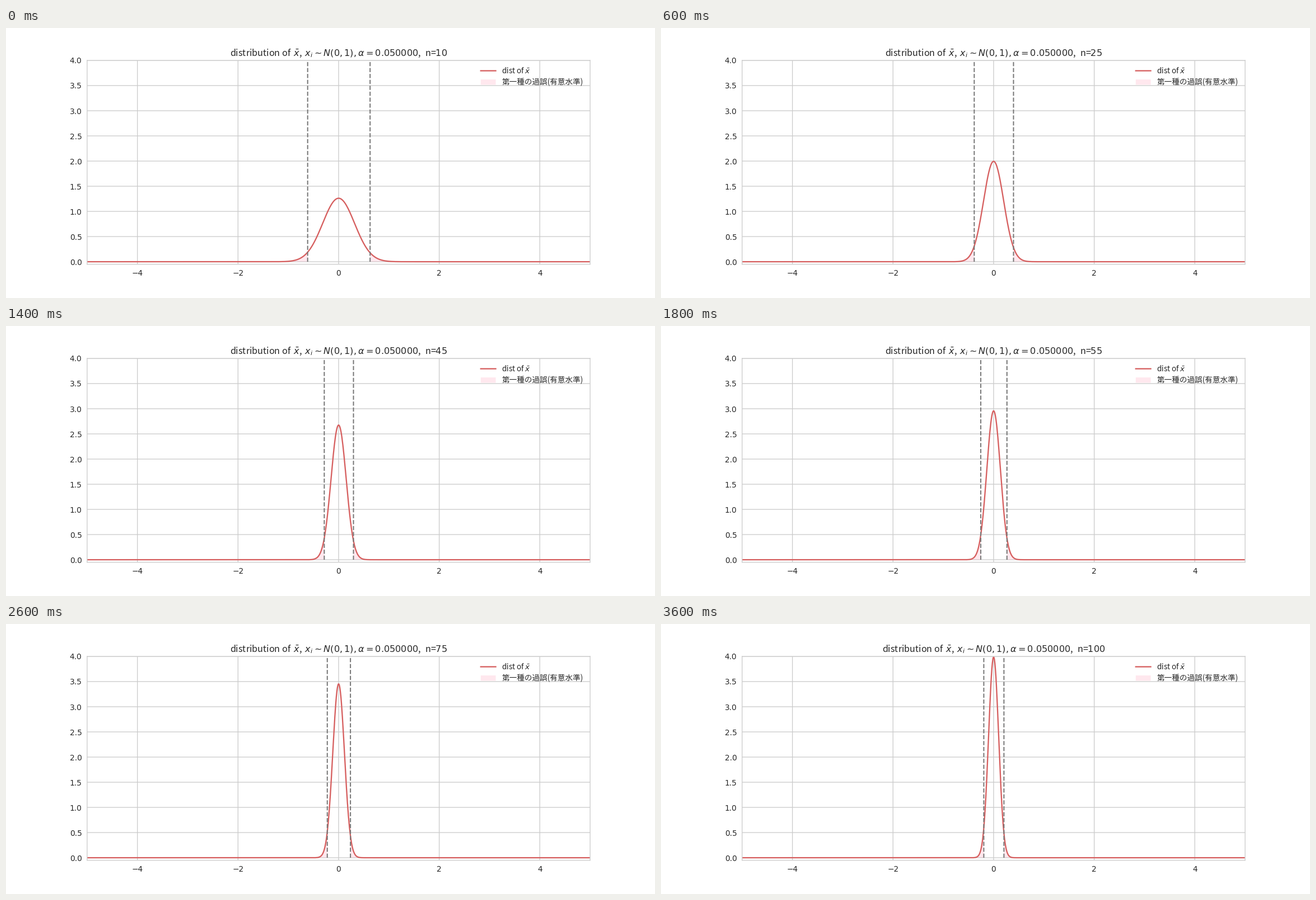
These frames come from a looping animation (1159 by 483 pixels, 3.8 s). A matplotlib script:

```python
import numpy as np
import matplotlib.pyplot as plt
from matplotlib.animation import FuncAnimation
from matplotlib.lines import Line2D
from matplotlib.patches import Rectangle

W, H, DPI = 1159, 483, 96
INK, GRID, RED, PINK, GRAY = "0.15", "0.8", "#d65f5f", "#ffb8cd", "#777777"
TEXT_FONT = "Noto Sans CJK JP"
PINK_ALPHA = 0.32
CURVE_WIDTH = 1.72
Z = 1.959964  # two-sided 5% point of the standard normal
SIZES = range(10, 101, 5)

plt.rcParams["path.snap"] = False
x = np.linspace(-5, 5, 1000)

fig = plt.figure(figsize=(W / DPI, H / DPI), dpi=DPI, facecolor="white")
ax = fig.add_axes([0.125, 0.125, 0.775, 0.755])
ax.set_xlim(-5, 5)
ax.set_ylim(-0.05, 4)
ax.set_xticks(range(-4, 5, 2))
ax.set_yticks(np.arange(0, 4.1, 0.5))
ax.set_axisbelow(True)
ax.grid(color=GRID, linewidth=1)
ax.tick_params(length=0, pad=7, labelsize=10.3, labelcolor=INK,
               labelfontfamily="DejaVu Sans")
for spine in ax.spines.values():
    spine.set(color=GRID, linewidth=1)

title = ax.set_title("", fontsize=12.1, color=INK, family=TEXT_FONT, pad=6)
tails = [ax.fill([0, 0], [0, 0], color=PINK, alpha=PINK_ALPHA, linewidth=0)[0]
         for _ in range(2)]
curve, = ax.plot([], [], color=RED, linewidth=CURVE_WIDTH)
limits = [ax.plot([], [], color=GRAY, linestyle="--", linewidth=1.5)[0]
          for _ in range(2)]


def label(px, py, text, size):
    """Text with its left baseline at a pixel counted from the top left."""
    fig.text(px / W, 1 - py / H, text, fontsize=size, color=INK,
             family=TEXT_FONT, va="baseline")


def draw_legend():
    left, length = 847.8, 26.8
    fig.add_artist(Line2D([left / W, (left + length) / W], [1 - 76.5 / H] * 2,
                          color=RED, linewidth=CURVE_WIDTH))
    fig.add_artist(Rectangle((left / W, 1 - 101.5 / H), length / W, 9.5 / H,
                             facecolor=PINK, alpha=PINK_ALPHA, linewidth=0))
    label(885.4, 81.2, r"dist of $\bar{x}$", 10.1)
    label(885.4, 101.2, "第一種の過誤(有意水準)", 10.2)


def density(n):
    return np.sqrt(n / (2 * np.pi)) * np.exp(-n * x**2 / 2)


def under_curve(y, part):
    xs, ys = x[part], y[part]
    return np.column_stack([np.r_[xs[0], xs, xs[-1]], np.r_[0, ys, 0]])


def update(i):
    n = SIZES[i]
    y = density(n)
    cut = Z / np.sqrt(n)
    # critical values fall on the next sample of the grid
    lo, hi = np.searchsorted(x, [-cut, cut])
    curve.set_data(x, y)
    for line, k in zip(limits, (lo, hi)):
        line.set_data([x[k], x[k]], [0, 4])
    for tail, part in zip(tails, (slice(0, lo + 1), slice(hi, None))):
        tail.set_xy(under_curve(y, part))
    title.set_text(r"distribution of $\,\bar{x}$, $\,x_i \sim N(0, 1), "
                   rf"\alpha = 0.050000$, $\;$n=${n}$")
    return [curve, title, *limits, *tails]


draw_legend()
anim = FuncAnimation(fig, update, frames=len(SIZES), interval=200,
                     repeat=True, repeat_delay=0, blit=False)
plt.show()
```
